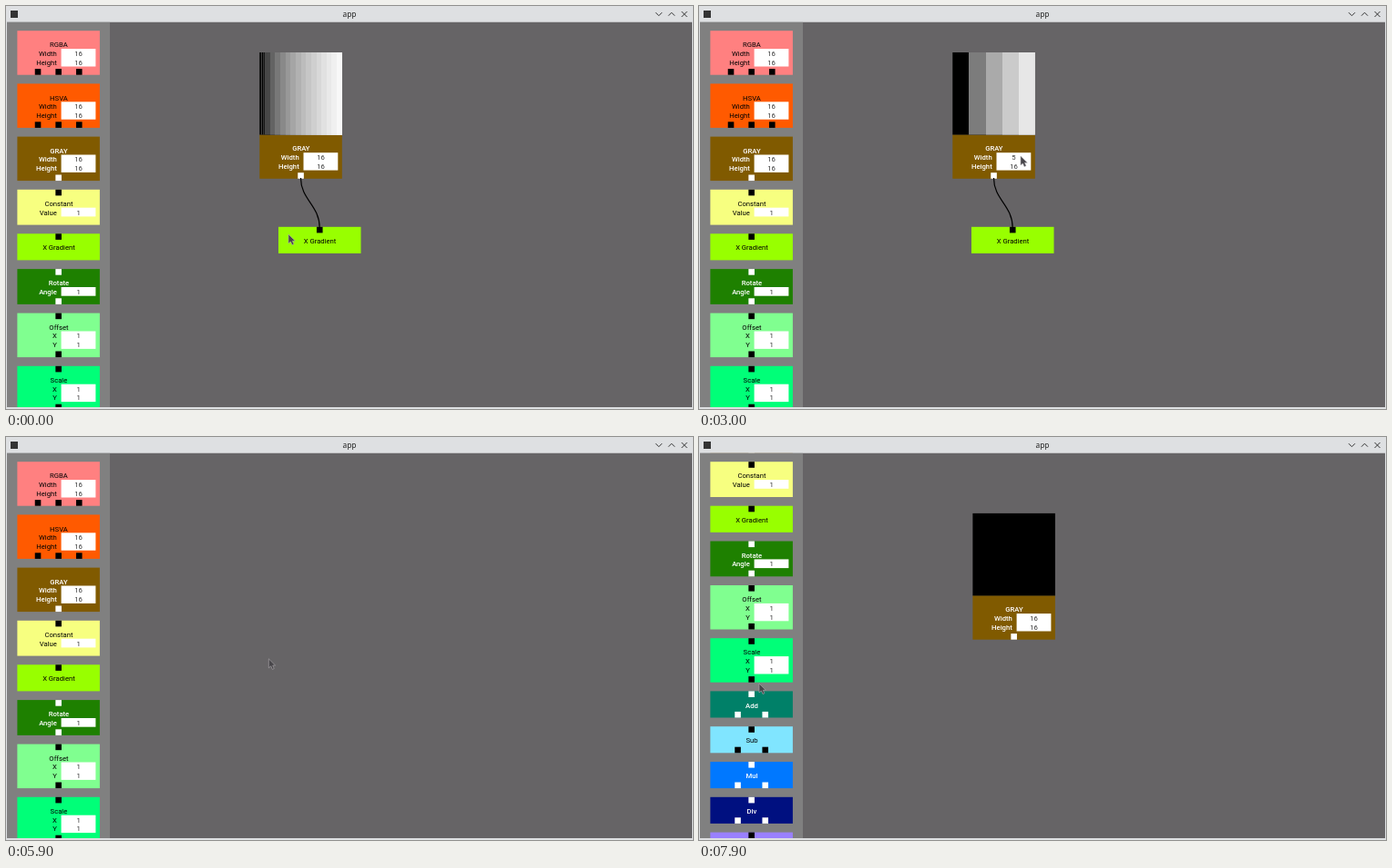
Recreate the animation shown at these times as an HTML page with a canvas. Size 754 by 443 pixels, loop 8 s.

```html
<!DOCTYPE html>
<html lang="en">
<head>
<meta charset="utf-8">
<title>app</title>
<style>
html, body { margin: 0; width: 754px; height: 443px; overflow: hidden; }
canvas { display: block; }
</style>
</head>
<body>
<canvas id="stage" width="754" height="443"></canvas>
<script>
const ctx = document.getElementById('stage').getContext('2d');
const LOOP = 8000, STEP = 100;
const U = 9.7, W = 90.5, PORT = 6.6;
const LEFT = 12.4, TOP = 27.2;

const kind = (title, color, fields, top, bottom, light) =>
  ({ title, color, fields, top, bottom, ink: light ? '#fff' : '#000', h: (3 + fields.length) * U });

const size = [['Width', 16], ['Height', 16]];
const xy = [['X', 1], ['Y', 1]];
const kinds = [
  kind('RGBA', '#ff8080', size, 0, 3),
  kind('HSVA', '#ff5a00', size, 0, 3),
  kind('GRAY', '#805a00', size, 0, 1, true),
  kind('Constant', '#f7ff80', [['Value', 1]], 1, 0),
  kind('X Gradient', '#98ff00', [], 1, 0),
  kind('Rotate', '#1e8000', [['Angle', 1]], 1, 1, true),
  kind('Offset', '#80ff90', xy, 1, 1),
  kind('Scale', '#00ff78', xy, 1, 1),
  kind('Add', '#008068', [], 1, 2, true),
  kind('Sub', '#80e5ff', [], 1, 2),
  kind('Mul', '#0078ff', [], 1, 2, true),
  kind('Div', '#001080', [], 1, 2, true),
  kind('Pow', '#9980ff', [], 1, 2)
];
const GRAY = kinds[2], XGRAD = kinds[4];

// [time, x, y]
const cursorPath = [
  [0, 310, 251], [800, 310, 251], [1900, 353, 165], [4600, 353, 165],
  [5000, 347, 165], [5300, 347, 165], [5700, 340, 257], [5800, 340, 257],
  [6400, 30, 178], [6600, 30, 178], [6800, 250, 205], [7000, 318, 209],
  [7400, 82, 274], [7900, 66, 271]
];
const dragPath = [[6800, 37.5, 154], [7000, 300.4, 174.2]];

function along(path, t) {
  const i = path.findIndex(k => k[0] > t);
  if (i < 0) return path[path.length - 1].slice(1);
  if (i === 0) return path[0].slice(1);
  const [t0, x0, y0] = path[i - 1], [t1, x1, y1] = path[i];
  const p = (t - t0) / (t1 - t0);
  return [x0 + (x1 - x0) * p, y0 + (y1 - y0) * p];
}

function rect(color, x, y, w, h) {
  ctx.fillStyle = color;
  ctx.fillRect(x, y, w, h);
}

function line(color, width, ...points) {
  ctx.strokeStyle = color;
  ctx.lineWidth = width;
  ctx.beginPath();
  points.forEach(p => ctx.lineTo(...p));
  ctx.stroke();
}

function text(str, x, y, color, align = 'center', font = '7.7px Roboto, sans-serif') {
  ctx.font = (color === '#fff' ? '500 ' : '') + font;
  ctx.textAlign = align;
  ctx.textBaseline = 'alphabetic';
  ctx.fillStyle = color;
  ctx.fillText(str, x, y + 2.8);
}

// Columns evenly spaced in linear light
function preview(x, y, cols) {
  rect('#000', x, y, W, W);
  for (let i = 1; i < cols; i++) {
    const v = Math.round(255 * (1.055 * (i / cols) ** (1 / 2.4) - 0.055));
    const a = Math.round(x + W * i / cols);
    rect(`rgb(${v},${v},${v})`, a, y, x + W - a, W);
  }
  if (cols === 16) for (const dx of [1.6, 4]) rect('#4a4a4a', x + dx, y, 1, W);
}

// Each layer covers the earlier layers of every node
const layers = [
  n => rect(n.kind.color, n.x, n.y, W, n.kind.h),
  n => {
    const { title, fields, ink } = n.kind;
    text(title, n.x + W / 2 + 0.3, n.y + 15.3, ink);
    fields.forEach(([name], i) => text(name, n.x + 43.4, n.y + 25 + i * U, ink, 'right'));
  },
  n => {
    const { fields } = n.kind;
    if (fields.length) rect('#fff', n.x + 48.2, n.y + 19.9, 37.8, fields.length * U);
    fields.forEach(([, value], i) =>
      text(i === 0 && n.value !== undefined ? n.value : value, n.x + 67.2, n.y + 25 + i * U, '#333'));
  },
  n => {
    const { top, bottom, ink, h } = n.kind;
    const row = (count, y) => {
      for (let i = 1; i <= count; i++)
        rect(ink, n.x + W * i / (count + 1) - PORT / 2, y, PORT, PORT);
    };
    row(top, n.y);
    row(bottom, n.y + h - PORT);
  },
  n => { if (n.cols) preview(n.x, n.y - W + 0.2, n.cols); }
];

function wire() {
  ctx.strokeStyle = '#000';
  ctx.lineWidth = 1.2;
  ctx.beginPath();
  ctx.moveTo(323.5, 189);
  ctx.bezierCurveTo(323.5, 213, 344.2, 219, 344.2, 244);
  ctx.stroke();
}

function cursor(x, y) {
  ctx.save();
  ctx.translate(x, y);
  ctx.beginPath();
  [[0, 0], [0, 10], [2.4, 8], [4, 11.6], [5.9, 10.7], [4.4, 7.3], [7.3, 7.2]]
    .forEach(p => ctx.lineTo(...p));
  ctx.closePath();
  ctx.fillStyle = '#48464a';
  ctx.fill();
  ctx.strokeStyle = '#b0aeb0';
  ctx.lineWidth = 0.6;
  ctx.stroke();
  ctx.restore();
}

function titleBar() {
  rect('#dee0e2', 0, 0, 754, 17.5);
  rect('#333', 5, 5, 8, 8);
  text('app', 377, 9, '#222', 'center', '8.4px "Noto Sans", sans-serif');
  const ink = '#333';
  line(ink, 1, [713, 7.2], [716.5, 10.7], [720, 7.2]);
  line(ink, 1, [727, 10.7], [730.5, 7.2], [734, 10.7]);
  line(ink, 1, [741.5, 6], [747.5, 12]);
  line(ink, 1, [747.5, 6], [741.5, 12]);
}

function typedWidth(t) {
  if (t < 2600) return '16';
  if (t < 2700) return '1';
  if (t < 2900) return '';
  return t < 3100 ? '5' : '50';
}

function scene(t) {
  const scroll = 6 * U * Math.min(3, Math.max(0, Math.floor((t - 7500) / 100)));
  const nodes = [];
  let y = TOP - scroll;
  for (const k of kinds) {
    nodes.push({ kind: k, x: LEFT, y });
    y += k.h + U;
  }
  if (t < 5300) {
    const value = typedWidth(t);
    nodes.push({ kind: GRAY, x: 278.3, y: 141.3, value, cols: +value || 1 });
  }
  if (t < 5800) nodes.push({ kind: XGRAD, x: 299, y: 242.8 });
  if (t >= 6800) {
    const [nx, ny] = along(dragPath, t);
    nodes.push({ kind: GRAY, x: nx, y: ny, cols: 1 });
  }
  return nodes;
}

function draw(t) {
  rect('#dee0e2', 0, 0, 754, 443);
  rect('#666466', 1, 17.5, 752, 423.5);
  rect('#808080', 1, 17.5, 113, 423.5);
  ctx.save();
  ctx.beginPath();
  ctx.rect(1, 17.5, 752, 423.5);
  ctx.clip();
  const nodes = scene(t);
  for (const layer of layers) nodes.forEach(layer);
  if (t < 5300) wire();
  ctx.restore();
  titleBar();
  cursor(...along(cursorPath, t));
}

const start = performance.now();
function tick() {
  const t = (performance.now() - start) % LOOP;
  draw(Math.floor(t / STEP) * STEP);
  requestAnimationFrame(tick);
}
tick();
</script>
</body>
</html>
```
